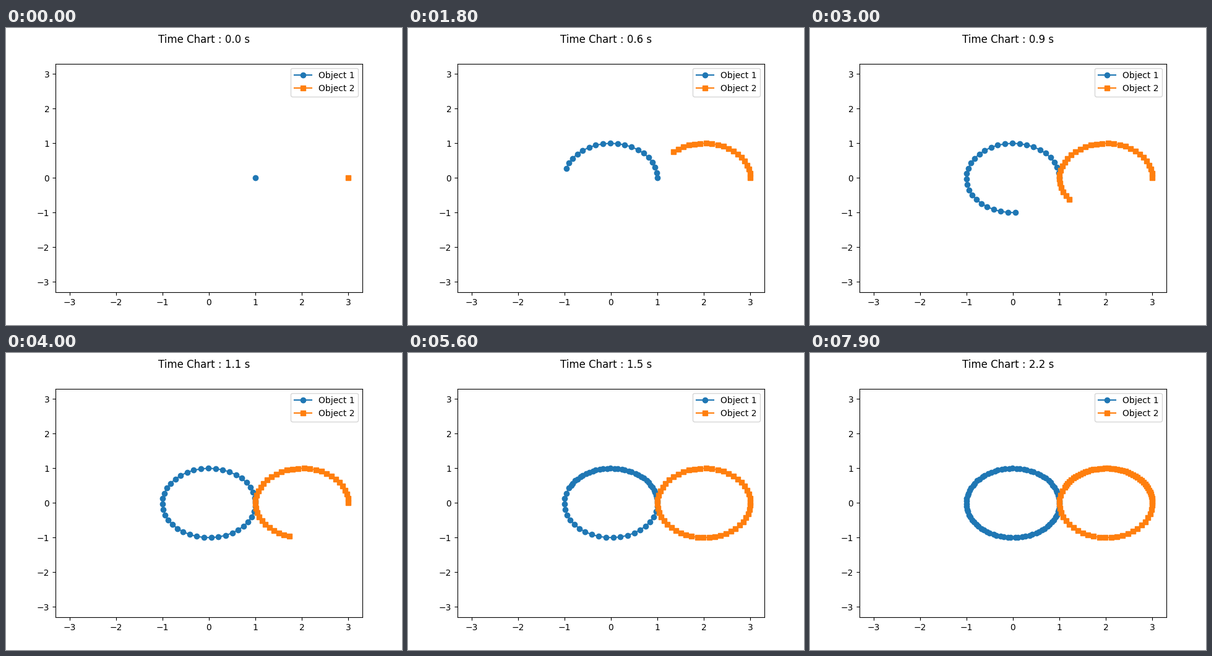
A matplotlib script for the animation above (8000 ms loop, 640 px wide and 480 px high).

```python
import numpy as np
import matplotlib.pyplot as plt
from matplotlib.animation import FuncAnimation

FRAMES = 80
STEP1 = 5 * np.pi / 99   # angle per sample, object 1
STEP2 = 4 * np.pi / 99   # angle per sample, object 2
DT = np.pi / 100         # clock seconds per sample
FAST, SLOW = 30, 15      # frames at full rate, then at half rate


def ticks(n):
    """Samples shown after n frames: full rate, then every other frame."""
    cycle, k = divmod(n, FAST + SLOW)
    per_cycle = FAST + (SLOW + 1) // 2
    return cycle * per_cycle + min(k, FAST) + (max(k - FAST, 0) + 1) // 2


def orbit(count, step, center):
    a = np.arange(count + 1) * step
    return center + np.cos(a), np.sin(a)


fig, ax = plt.subplots(figsize=(6.4, 4.8), dpi=100)
ax.set_xlim(-3.3, 3.3)
ax.set_ylim(-3.3, 3.3)
line1, = ax.plot([], [], "-o", color="C0", label="Object 1")
line2, = ax.plot([], [], "-s", color="C1", label="Object 2")
ax.legend(loc="upper right")
title = fig.suptitle("Time Chart : 0.0 s")


def update(n):
    s = ticks(n)
    line1.set_data(*orbit(n, STEP1, 0))
    line2.set_data(*orbit(s, STEP2, 2))
    title.set_text(f"Time Chart : {s * DT:.1f} s")
    return line1, line2, title


anim = FuncAnimation(fig, update, frames=FRAMES, interval=100,
                     repeat=True, repeat_delay=0, blit=False)
plt.show()
```
